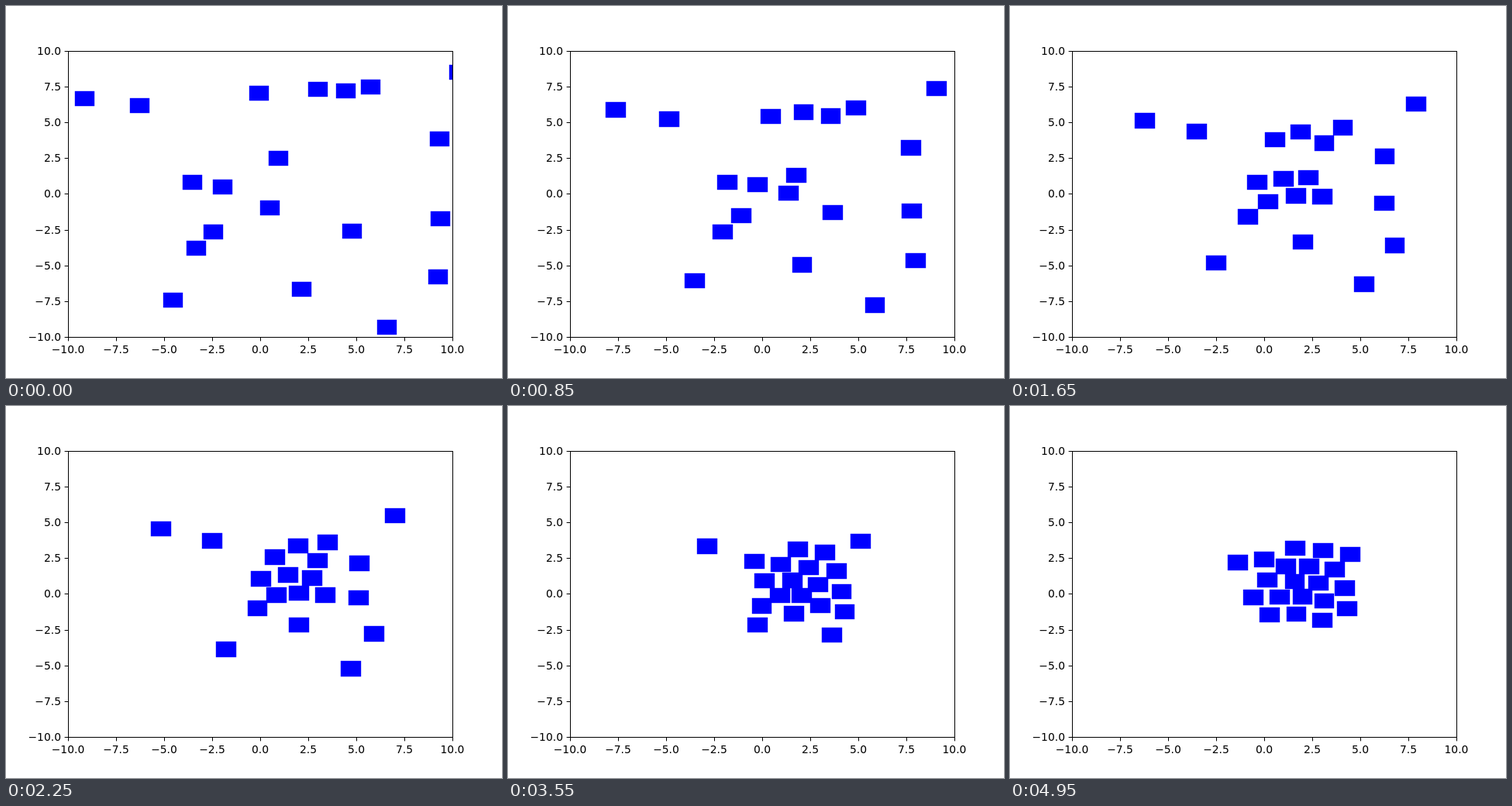
These frames come from a looping animation (640x480 px, 5 s). An HTML page:

```html
<!DOCTYPE html>
<html lang="en">
<head>
<meta charset="utf-8">
<title>Gathering squares</title>
<style>
  html, body { margin: 0; width: 100%; height: 100%; overflow: hidden; background: #fff; }
  svg { display: block; width: 640px; height: 480px; }
  text { font: 13.89px "DejaVu Sans", sans-serif; }
  #axes { fill: none; stroke: #000; stroke-width: 1; }
  #swarm { fill: #00f; stroke: #00f; stroke-width: 1.39; }
</style>
</head>
<body>
<svg viewBox="0 0 640 480">
  <clipPath id="plot"><rect x="80" y="57.6" width="496" height="369.6"/></clipPath>
  <g id="swarm" clip-path="url(#plot)"></g>
  <g id="axes"><rect x="80.5" y="58.5" width="496" height="369"/></g>
  <g id="labels"></g>
</svg>
<script>
const STEP = 50, STEPS = 100;
const UNIT_X = 24.8, UNIT_Y = 18.48;   // pixels per data unit
const SPEED = 0.1;                     // pull towards the common centre, per step
const REACH = 1.5, PUSH = 0.5;         // neighbours closer than REACH push apart

// Starting centres in pixels
const starts = [
  [101, 119], [172, 128], [326, 112], [402, 107], [438, 109],
  [470, 104], [584, 85], [559, 171], [351, 196], [240, 227],
  [279, 233], [340, 260], [267, 291], [245, 312], [446, 290],
  [560, 274], [557, 349], [215, 379], [381, 365], [491, 414]
];

const mean = (list, key) => list.reduce((sum, p) => sum + p[key], 0) / list.length;

// One step: every square heads for the centre and is pushed off its neighbours
function advance(swarm) {
  const next = swarm.map(p => ({ ...p }));
  const cx = mean(next, "x"), cy = mean(next, "y");
  for (const p of next) {
    const dist = Math.hypot(cx - p.x, cy - p.y) || 1;
    let vx = SPEED * (cx - p.x) / dist;
    let vy = SPEED * (cy - p.y) / dist;
    for (const q of next) {
      const gap = Math.hypot(p.x - q.x, p.y - q.y);
      if (q === p || gap >= REACH) continue;
      const force = PUSH * (REACH - gap) / (gap || 1);
      vx += force * (p.x - q.x);
      vy += force * (p.y - q.y);
    }
    p.x += vx;
    p.y += vy;
  }
  return next;
}

const states = [starts.map(([x, y]) => ({ x: x / UNIT_X, y: y / UNIT_Y }))];
while (states.length < STEPS) states.push(advance(states[states.length - 1]));

function add(parent, name, attrs, text = "") {
  const el = document.createElementNS("http://www.w3.org/2000/svg", name);
  setAttrs(el, attrs);
  el.textContent = text;
  document.getElementById(parent).append(el);
  return el;
}

function setAttrs(el, attrs) {
  for (const key in attrs) el.setAttribute(key, attrs[key]);
}

const snap = v => Math.round(v) + 0.5;

for (let i = 0; i <= 8; i++) {
  const label = (i * 2.5 - 10).toFixed(1).replace("-", "\u2212");
  const x = 80 + 62 * i, y = 427.2 - 46.2 * i;
  add("axes", "path", { d: `M${snap(x)} 427.5v4.86M80.5 ${snap(y)}h-4.86` });
  add("labels", "text", { x, y: 448, "text-anchor": "middle" }, label);
  add("labels", "text", { x: 71, y: Math.round(y + 5), "text-anchor": "end" }, label);
}

const squares = starts.map(() => add("swarm", "rect", {}));

function draw(step) {
  states[step].forEach((p, i) => {
    const x = snap((p.x - 0.5) * UNIT_X), y = snap((p.y - 0.5) * UNIT_Y);
    const width = snap((p.x + 0.5) * UNIT_X) - x;
    const height = snap((p.y + 0.5) * UNIT_Y) - y;
    setAttrs(squares[i], { x, y, width, height });
  });
}

const start = performance.now();
function tick() {
  const elapsed = Math.max(0, performance.now() - start);
  draw(Math.floor(elapsed / STEP) % STEPS);
  requestAnimationFrame(tick);
}
tick();
</script>
</body>
</html>
```
